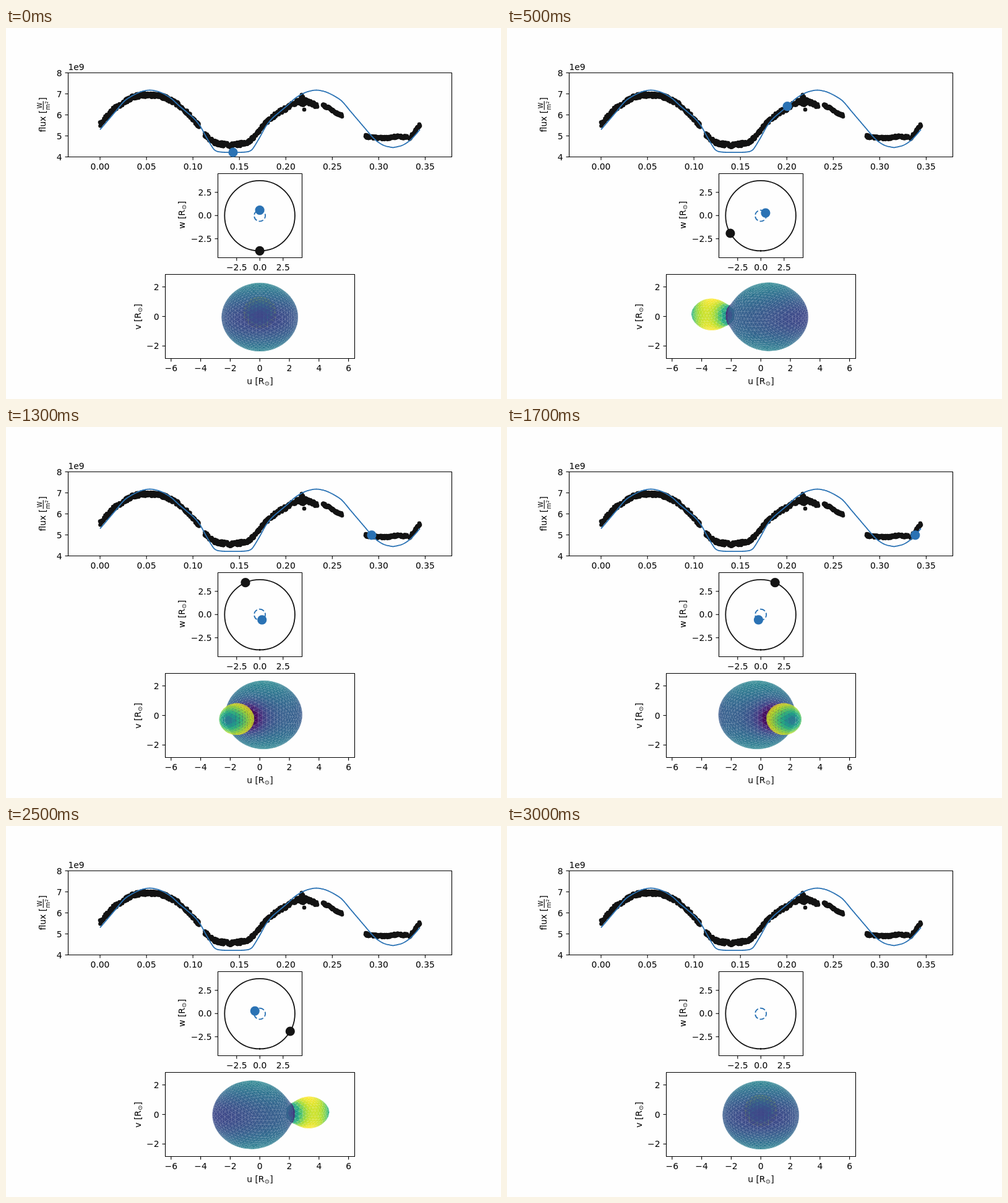
Recreate the animation shown at these times as an HTML page with a canvas. Size 800 px wide and 600 px high, loop 3100 ms.

```html
<!DOCTYPE html>
<html lang="en">
<head>
<meta charset="utf-8">
<title>Contact binary light curve</title>
<style>
html, body { margin: 0; width: 100%; height: 100%; overflow: hidden; background: #fefefe; }
canvas { display: block; }
</style>
</head>
<body>
<canvas id="stage" width="800" height="600"></canvas>
<script>
const BLUE = '#2a72b4', BLACK = '#141414';
const STEPS = 30, STEP_MS = 100, LOOP_MS = 3100;
const FONT = '"DejaVu Sans", sans-serif';
const ORBIT = { x: 410.1, y: 303.6, big: 9, small: 56.8 };
const ctx = document.getElementById('stage').getContext('2d');

function dot(c, x, y, r, color) {
  c.fillStyle = color;
  c.beginPath();
  c.arc(x, y, r, 0, 2 * Math.PI);
  c.fill();
}

// Piecewise cubic through [x, y] points
function curve(points) {
  const slope = i => {
    const a = points[Math.max(i - 1, 0)], b = points[Math.min(i + 1, points.length - 1)];
    return (b[1] - a[1]) / (b[0] - a[0]);
  };
  return x => {
    let i = 0;
    while (i < points.length - 2 && x > points[i + 1][0]) i++;
    const [x0, y0] = points[i], [x1, y1] = points[i + 1];
    const h = x1 - x0, t = (x - x0) / h, s = 1 - t;
    return s * s * ((1 + 2 * t) * y0 + t * h * slope(i)) + t * t * ((3 - 2 * t) * y1 - s * h * slope(i + 1));
  };
}

// ---- Light curve, mirrored around both eclipses ----
const PERIOD = 516.8, ECLIPSE = 367;
const halfCurve = curve([
  [0, 201.2], [14, 201], [24, 200], [28, 198.5], [32, 195], [43, 177], [53, 159], [63, 146.5],
  [75, 136], [88, 125], [100, 114], [113, 106], [124, 102], [135, 100.5], [147, 102.5], [156, 106],
  [167, 112], [176, 118.5], [190, 135], [213, 162], [225, 176], [233, 183.5], [244, 190], [258.4, 193.5]
]);
function fluxY(x) {
  const d = Math.abs(x - ECLIPSE);
  return halfCurve(Math.min(d, PERIOD - d));
}

const observed = [
  [[152, 156], [172, 133], [185, 124], [200, 114.5], [215, 109.5], [232, 108], [250, 110.5], [262, 115], [275, 122], [290, 134], [302, 147], [312, 159]],
  [[321, 172], [335, 184], [350, 188], [367, 189.5], [385, 186], [395, 182], [405, 171], [415, 159], [425, 149], [440, 137], [455, 129], [465, 122], [478, 118], [490, 120], [503, 126]],
  [[512, 125], [522, 130], [532, 136], [543, 142]],
  [[581, 175], [590, 177], [615, 178], [630, 176], [648, 177]],
  [[652, 178], [660, 169], [669, 156.5]]
];

// ---- Fixed parts of the figure ----
function text(c, str, x, y, align = 'center', size = 13.89) {
  c.font = `${size}px ${FONT}`;
  c.textAlign = align;
  c.fillText(str, x, y);
  return c.measureText(str).width;
}

function line(c, x0, y0, x1, y1) {
  c.beginPath();
  c.moveTo(x0, y0);
  c.lineTo(x1, y1);
  c.stroke();
}

function axes(c, [x, y, w, h], xTicks, yTicks) {
  c.strokeStyle = c.fillStyle = '#000';
  c.lineWidth = 1.1;
  c.strokeRect(x, y, w, h);
  for (const [px, label] of xTicks) {
    line(c, px, y + h, px, y + h + 5);
    text(c, label, px, y + h + 20.8);
  }
  for (const [py, label] of yTicks) {
    line(c, x, py, x - 5, py);
    text(c, label, x - 10, py + 5, 'right');
  }
}

function solarLabel(c, name, x, y, angle) {
  c.save();
  c.translate(x, y);
  c.rotate(angle);
  let end = -21.3;
  end += text(c, name + ' [R', end, 0, 'left');
  end += text(c, '⊙', end, 2.3, 'left', 9.72);
  text(c, ']', end + 0.6, 0, 'left');
  c.restore();
}

function fluxLabel(c) {
  c.save();
  c.translate(64, 140.5);
  c.rotate(-Math.PI / 2);
  text(c, 'flux [', -28, 0, 'left');
  text(c, 'W', 15, -6.3, 'center', 9.72);
  text(c, 'm', 8, 7.2, 'left', 9.72);
  text(c, '2', 17.7, 3.6, 'left', 6.8);
  line(c, 8, -3.8, 22.3, -3.8);
  text(c, ']', 28.5, 0, 'right');
  c.restore();
}

function drawObserved(c) {
  let seed = 7;
  const noise = () => (seed = (seed * 16807) % 2147483647) / 1073741823.5 - 1;
  for (const points of observed) {
    const centre = curve(points);
    for (let x = points[0][0]; x <= points[points.length - 1][0]; x += 0.5) {
      const spread = x > 474 && x < 484 ? 7 : x > 500 ? 2.2 : 3.4;
      dot(c, x, centre(x) + spread * noise(), 3.3, BLACK);
    }
  }
  dot(c, 478, 108, 3.3, BLACK);
  dot(c, 482, 132, 3.3, BLACK);
}

function drawFigure(c) {
  c.fillStyle = '#fefefe';
  c.fillRect(0, 0, 800, 600);
  drawObserved(c);

  c.lineWidth = 1.8;
  c.lineJoin = 'round';
  c.strokeStyle = BLUE;
  c.beginPath();
  for (let x = 152; x <= 669; x++) c.lineTo(x, fluxY(x));
  c.stroke();

  c.setLineDash([7.7, 3.3]);
  c.beginPath();
  c.arc(ORBIT.x, ORBIT.y, ORBIT.big, -Math.PI / 2, 1.5 * Math.PI);
  c.stroke();
  c.setLineDash([]);
  c.strokeStyle = BLACK;
  c.beginPath();
  c.arc(ORBIT.x, ORBIT.y, ORBIT.small, 0, 2 * Math.PI);
  c.stroke();
  dot(c, ORBIT.x, ORBIT.y + ORBIT.small, 1.4, BLACK);

  const range = (n, fn) => Array.from({ length: n }, (_, i) => fn(i));
  const signed = (v, digits) => v.toFixed(digits).replace('-', '−');
  axes(c, [100.5, 72.5, 620, 136],
    range(8, i => [152 + 75.07 * i, (i * 0.05).toFixed(2)]),
    range(5, i => [208.5 - 34 * i, String(4 + i)]));
  text(c, '1e9', 100.5, 68, 'left');
  fluxLabel(c);
  const thirds = range(3, i => 2.5 * (i - 1));
  axes(c, [342.5, 235.5, 136, 136],
    thirds.map(v => [410.3 + 15 * v, signed(v, 1)]),
    thirds.map(v => [303.3 - 15 * v, signed(v, 1)]));
  solarLabel(c, 'w', 288.5, 303.5, -Math.PI / 2);
  axes(c, [257.5, 398.5, 306, 136],
    range(7, i => [410.2 + 47.8 * (i - 3), signed(2 * (i - 3), 0)]),
    range(3, i => [466.5 - 47.8 * (i - 1), signed(2 * (i - 1), 0)]));
  solarLabel(c, 'v', 217.5, 466.5, -Math.PI / 2);
  solarLabel(c, 'u', 410.5, 576, 0);
}

// ---- Roche surface: big star at the origin, companion at x = 1 ----
const Q = 0.158, SURFACE = 2.037, NECK = 0.6795;

function potential(x, y, z) {
  return 1 / Math.hypot(x, y, z) + Q * (1 / Math.hypot(x - 1, y, z) - x) + (1 + Q) / 2 * (x * x + y * y);
}

function gravity(x, y, z) {
  const a = Math.hypot(x, y, z) ** -3, b = Q * Math.hypot(x - 1, y, z) ** -3;
  return Math.hypot(-x * a - (x - 1) * b - Q + (1 + Q) * x, y * (1 + Q - a - b), z * (a + b));
}

const VIRIDIS = [0x440154, 0x482878, 0x3e4989, 0x31688e, 0x26828e, 0x1f9e89, 0x35b779, 0x6ece58, 0xb5de2b, 0xfde725];
function viridis(v) {
  const p = Math.min(Math.max(v, 0), 1) * 9, i = Math.min(Math.floor(p), 8), f = p - i;
  const mix = shift => Math.round((VIRIDIS[i] >> shift & 255) * (1 - f) + (VIRIDIS[i + 1] >> shift & 255) * f);
  return `rgb(${mix(16)},${mix(8)},${mix(0)})`;
}

// Geodesic triangles of the unit sphere, each icosahedron edge cut in n
function geodesic(n) {
  const phi = (1 + Math.sqrt(5)) / 2, corners = [], triangles = [];
  for (const a of [-1, 1]) for (const b of [-phi, phi]) corners.push([0, a, b], [a, b, 0], [b, 0, a]);
  const near = (p, q) => Math.hypot(p[0] - q[0], p[1] - q[1], p[2] - q[2]) < 2.1;
  corners.forEach((A, i) => corners.forEach((B, j) => corners.forEach((C, k) => {
    if (!(i < j && j < k && near(A, B) && near(B, C) && near(A, C))) return;
    const at = (r, s) => {
      const p = A.map((v, m) => (v * (n - r - s) + B[m] * r + C[m] * s) / n);
      const length = Math.hypot(...p);
      return p.map(v => v / length);
    };
    for (let r = 0; r < n; r++) for (let s = 0; s < n - r; s++) {
      triangles.push([at(r, s), at(r + 1, s), at(r, s + 1)]);
      if (r + s < n - 1) triangles.push([at(r + 1, s), at(r + 1, s + 1), at(r, s + 1)]);
    }
  })));
  return triangles;
}

function star(cx, reach, detail, heat) {
  const onSurface = ([dx, dy, dz]) => {
    const toNeck = (NECK - cx) / dx;
    let lo = 0, hi = toNeck > 0 ? Math.min(reach, toNeck) : reach;
    for (let i = 0; i < 30; i++) {
      const r = (lo + hi) / 2;
      if (potential(cx + r * dx, r * dy, r * dz) > SURFACE) lo = r; else hi = r;
    }
    return [cx + lo * dx, lo * dy, lo * dz];
  };
  return geodesic(detail).map(directions => {
    let points = directions.map(onSurface);
    const [a, b, c] = points;
    const mid = a.map((v, m) => (v + b[m] + c[m]) / 3);
    const e = b.map((v, m) => v - a[m]), f = c.map((v, m) => v - a[m]);
    const outward = (mid[0] - cx) * (e[1] * f[2] - e[2] * f[1]) + mid[1] * (e[2] * f[0] - e[0] * f[2]) + mid[2] * (e[0] * f[1] - e[1] * f[0]);
    if (outward < 0) points = [a, c, b];
    const temperature = heat * gravity(...mid) ** 0.08;
    return { points, color: viridis(0.22 + 3.9 * (temperature - 1.05)) };
  });
}

const mesh = [...star(0, 0.72, 11, 1), ...star(1, 0.37, 6, 1.149)];
const TILT = 0.07;

function drawStars(angle) {
  const sin = Math.sin(angle), cos = Math.cos(angle);
  const project = ([x, y, z]) => {
    const X = x * 4.4 - 0.6, Y = y * 4.4, Z = z * 4.4;
    const u = -X * sin - Y * cos, w = Y * sin - X * cos;
    return [
      410.2 + 23.9 * u,
      466.5 - 23.9 * (Z * Math.cos(TILT) - w * Math.sin(TILT)),
      w * Math.cos(TILT) + Z * Math.sin(TILT)
    ];
  };
  const visible = [];
  for (const { points, color } of mesh) {
    const [a, b, c] = points.map(project);
    const area = (b[0] - a[0]) * (c[1] - a[1]) - (b[1] - a[1]) * (c[0] - a[0]);
    if (area < 0) visible.push({ a, b, c, color, depth: a[2] + b[2] + c[2] });
  }
  visible.sort((p, q) => p.depth - q.depth);
  for (const { a, b, c, color } of visible) {
    ctx.fillStyle = color;
    ctx.beginPath();
    ctx.moveTo(a[0], a[1]);
    ctx.lineTo(b[0], b[1]);
    ctx.lineTo(c[0], c[1]);
    ctx.fill();
  }
}

// ---- Animation ----
const figure = document.createElement('canvas');
figure.width = 800;
figure.height = 600;
drawFigure(figure.getContext('2d'));

function drawStep(step) {
  const angle = 2 * Math.PI * step / STEPS, sin = Math.sin(angle), cos = Math.cos(angle);
  ctx.drawImage(figure, 0, 0);
  drawStars(angle);
  if (step === STEPS) return;
  const x = ECLIPSE + PERIOD * step / STEPS;
  if (x < 669) dot(ctx, x, fluxY(x), 7.6, BLUE);
  dot(ctx, ORBIT.x - ORBIT.small * sin, ORBIT.y + ORBIT.small * cos, 7.6, BLACK);
  dot(ctx, ORBIT.x + ORBIT.big * sin, ORBIT.y - ORBIT.big * cos, 7.6, BLUE);
}

let shown = -1;
function tick() {
  const step = Math.floor(performance.now() % LOOP_MS / STEP_MS);
  if (step !== shown) drawStep(shown = step);
  requestAnimationFrame(tick);
}
tick();
</script>
</body>
</html>
```
